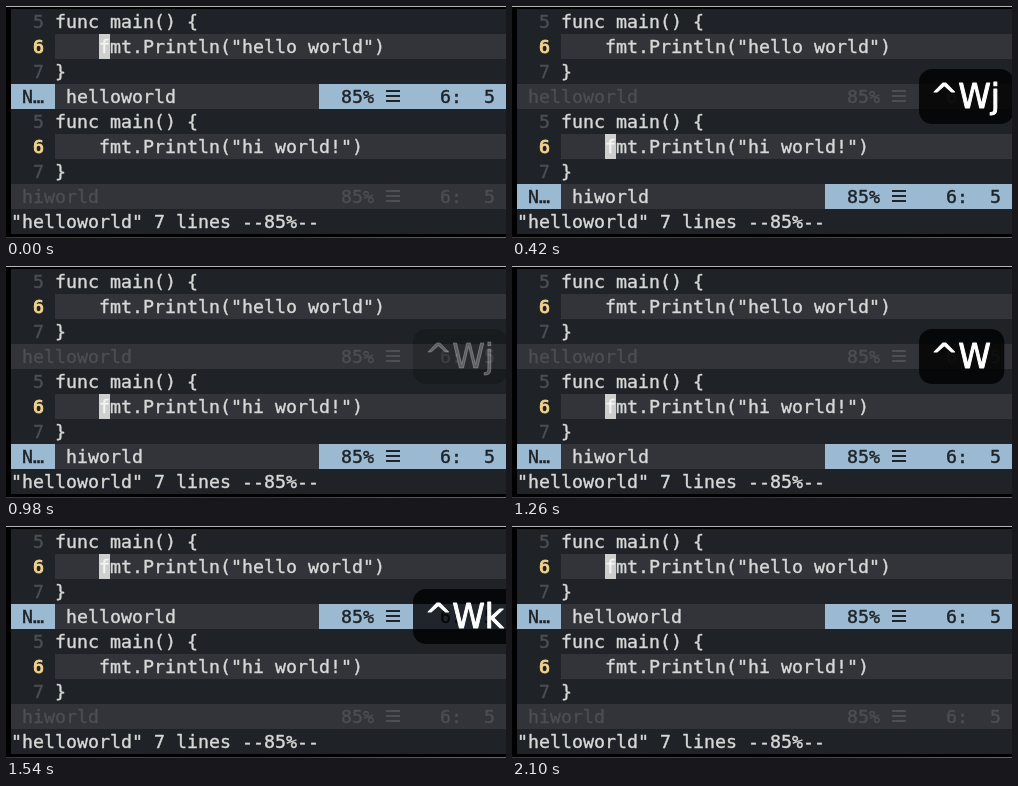
An HTML page with a canvas that plays this animation: 500x232 px, repeating every 2.17 s.

```html
<!DOCTYPE html>
<html lang="en">
<head>
<meta charset="utf-8">
<title>Switching panes</title>
<style>
html, body { margin: 0; width: 100%; height: 100%; overflow: hidden; background: #000; }
canvas { display: block; width: 500px; height: 232px; }
</style>
</head>
<body>
<canvas id="stage"></canvas>
<script>
const W = 500, H = 232, LOOP = 2170, TICK = 70;
const LEFT = 5, TOP = 3, CELL = 11, ROW = 25;
const MONO = '18.27px "DejaVu Sans Mono", monospace';
const KEYS = '33px "DejaVu Sans", sans-serif';
const C = {
  bg: '#1f2327', line: '#323439', text: '#d6d8d6', dim: '#4b4e52',
  number: '#f0d28c', blue: '#9bb9d1', ink: '#1f2428', cursor: '#cfd0ce'
};

const canvas = document.getElementById('stage');
const ctx = canvas.getContext('2d');
const ratio = window.devicePixelRatio || 1;
canvas.width = W * ratio;
canvas.height = H * ratio;
ctx.scale(ratio, ratio);
ctx.lineJoin = 'round';

const colX = col => LEFT + col * CELL;
const rowY = row => TOP + row * ROW;

function rect(x, y, w, h, color) {
  ctx.fillStyle = color;
  ctx.fillRect(x, y, w, h);
}

// Text thickened by a thin outline.
function label(str, x, y, font, color, weight) {
  ctx.font = font;
  ctx.fillStyle = ctx.strokeStyle = color;
  ctx.lineWidth = weight;
  ctx.fillText(str, x, y);
  ctx.strokeText(str, x, y);
}

function write(str, col, row, color, weight = 0.4) {
  label(str, colX(col), rowY(row) + 19, MONO, color, weight);
}

function status(row, name, active) {
  const y = rowY(row), color = active ? C.ink : C.dim;
  rect(LEFT, y, W - LEFT, ROW, C.line);
  if (active) {
    rect(LEFT, y, 4 * CELL, ROW, C.blue);
    rect(colX(28), y, W - colX(28), ROW, C.blue);
    write('N…', 1, row, color);
  }
  write(name, active ? 5 : 1, row, active ? C.text : C.dim);
  write('85%', 30, row, color);
  for (let i = 0; i < 3; i++) rect(380, y + 6 + i * 5, 14, 2, color);
  write('6:', 39, row, color);
  write('5', 43, row, color);
}

function pane(row, name, message, active) {
  rect(colX(4), rowY(row + 1), W - colX(4), ROW, C.line);
  write('5', 2, row, C.dim);
  write('6', 2, row + 1, C.number, 1);
  write('7', 2, row + 2, C.dim);
  write('func main() {', 4, row, C.text);
  write(`fmt.Println("${message}")`, 8, row + 1, C.text);
  write('}', 4, row + 2, C.text);
  if (active) {
    rect(colX(8), rowY(row + 1), CELL, ROW, C.cursor);
    write('f', 8, row + 1, '#f4f4f4');
  }
  status(row + 3, name, active);
}

function overlay(keys, alpha) {
  ctx.save();
  ctx.globalAlpha = alpha;
  ctx.font = KEYS;
  const width = ctx.measureText(keys).width + 25;
  ctx.fillStyle = 'rgba(0,0,0,0.8)';
  ctx.beginPath();
  ctx.roundRect(407, 63, width, 55, 13);
  ctx.fill();
  label(keys, 418.5, 102, KEYS, '#fff', 1);
  ctx.restore();
}

// Each key press shows from start to end; some fade out on the way.
const presses = [
  { keys: '^W', start: 140, end: 350 },
  { keys: '^Wj', start: 350, fade: 770, end: 1050 },
  { keys: '^W', start: 1190, end: 1470 },
  { keys: '^Wk', start: 1470, fade: 1820, end: 2100 }
];

function desktop() {
  rect(0, 0, W, H, '#000');
  rect(0, 0, W, 1, '#b4b4b4');
  const strip = ctx.createLinearGradient(0, 0, W, 0);
  ['#3c3d18', '#4a4a1c', '#3a3830', '#54524c', '#6a6862']
    .forEach((c, i) => strip.addColorStop(i / 4, c));
  ctx.fillStyle = strip;
  ctx.fillRect(0, 231, W, 1);
  rect(LEFT, TOP, W - LEFT, 9 * ROW, C.bg);
}

function draw(t) {
  desktop();
  const lower = t >= 350 && t < 1470;
  pane(0, 'helloworld', 'hello world', !lower);
  pane(4, 'hiworld', 'hi world!', lower);
  write('"helloworld" 7 lines --85%--', 0, 8, C.text);
  const press = presses.find(p => t >= p.start && t < p.end);
  if (press) {
    const { keys, fade, end } = press;
    overlay(keys, fade && t > fade ? (end - t) / (end - fade) : 1);
  }
}

function frame() {
  const t = performance.now() % LOOP;
  draw(Math.floor(t / TICK) * TICK);
  requestAnimationFrame(frame);
}
frame();
</script>
</body>
</html>
```
